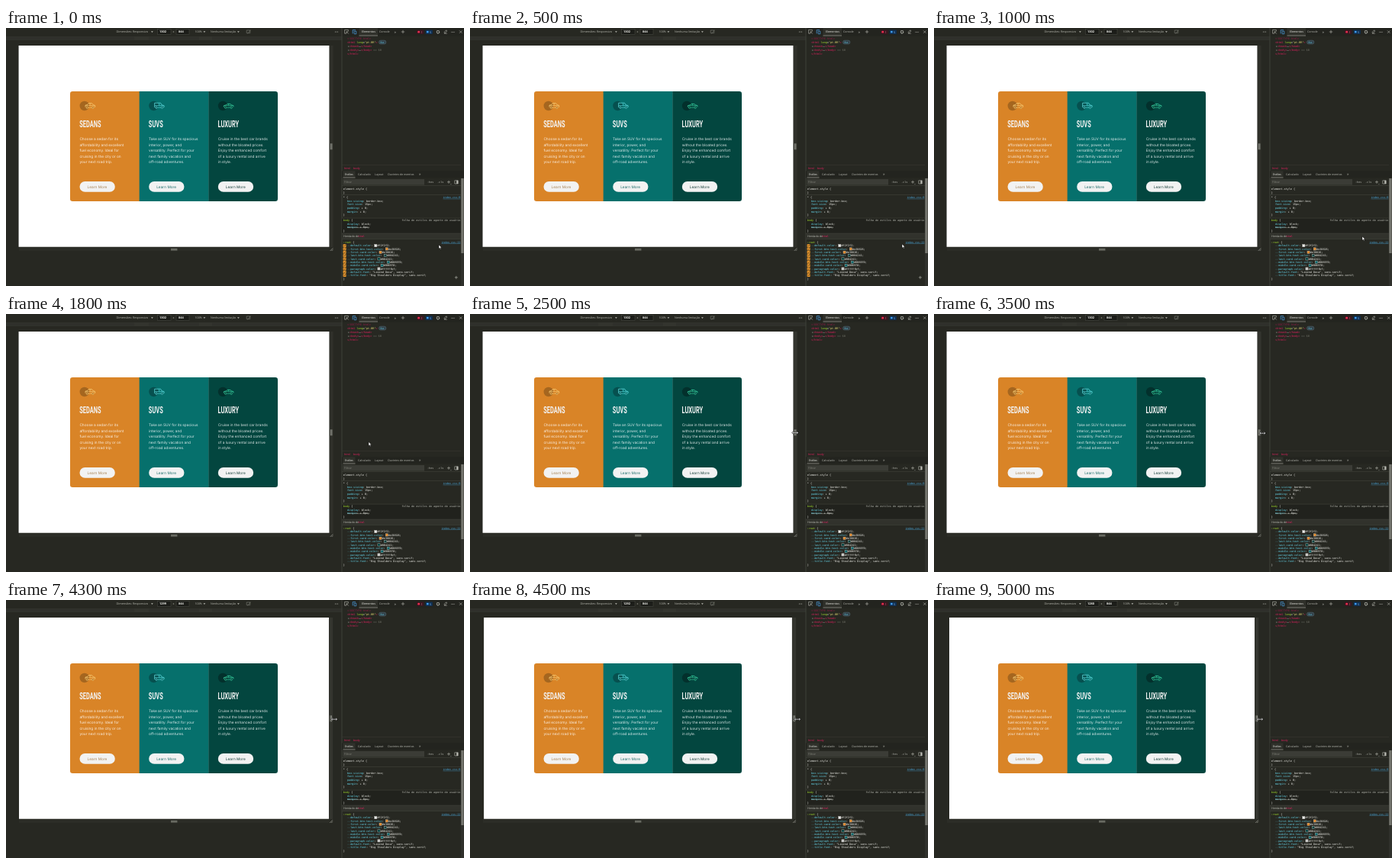
An HTML page that plays this animation: 600x338 px, repeating every 5100 ms.

```html
<!DOCTYPE html>
<html lang="pt-BR">
<head>
<meta charset="utf-8">
<title>Responsive cards</title>
<style>
  html, body { margin: 0; width: 100%; height: 100%; overflow: hidden; background: #272822; }
  svg { display: block; width: 600px; height: 338px; }
  text { white-space: pre; text-rendering: geometricPrecision; }
  .ui { font: 3.65px "Open Sans", "Noto Sans", sans-serif; }
  .mono { font: 3.46px "DejaVu Sans Mono", monospace; }
  .copy { font: 4.78px Inter, sans-serif; }
  .title { font: 700 12.6px Roboto, sans-serif; }
</style>
</head>
<body>
<svg id="stage" viewBox="0 0 600 338"></svg>
<script>
const LOOP = 5100, STEP = 100, SCALE = 0.3125, MID = 220;
const WHITE = '#f3f3ee', GREY = '#b9bab2', RED = '#e0205f', CYAN = '#66d9ef', GREEN = '#a6e22e';
const stage = document.getElementById('stage');

function add(tag, attrs, parent = stage) {
  const el = document.createElementNS('http://www.w3.org/2000/svg', tag);
  for (const k in attrs) el.setAttribute(k, attrs[k]);
  parent.appendChild(el);
  return el;
}
const rect = (x, y, width, height, fill, more = {}, parent) =>
  add('rect', { x, y, width, height, fill, ...more }, parent);
const path = (d, stroke, width = 0.6, more = {}, parent) =>
  add('path', { d, stroke, 'stroke-width': width, fill: 'none', ...more }, parent);
function text(cls, x, y, str, fill, more = {}, parent) {
  const el = add('text', { class: cls, x, y, fill, ...more }, parent);
  el.textContent = str;
  return el;
}
// Coloured runs: colour, string, colour, string...
function runs(x, y, parts, more = {}) {
  const el = add('text', { class: 'mono', x, y, ...more });
  for (let i = 0; i < parts.length; i += 2)
    add('tspan', { fill: parts[i] }, el).textContent = parts[i + 1];
}
const ui = (x, y, str, fill = GREY, more) => text('ui', x, y, str, fill, more);
const caret = (x, y) => path(`M${x} ${y}h2.8l-1.4 1.9z`, 'none', 0, { fill: GREY });
const dots = (x, y) => [-1.7, 0, 1.7].forEach(d => add('circle', { cx: x + d, cy: y, r: 0.5, fill: GREY }));

// Device toolbar
rect(0, 0, 440, 338, '#272822');
rect(0, 11, 440, 5, '#33342e');
[[0, 168], [187, 66], [270, 170]].forEach(([x, w]) => rect(x, 11.5, w, 4, '#2f302b'));
ui(144.5, 6.4, 'Dimensões: Responsivo', GREY, { style: 'font-size:3.75px' });
caret(190, 4.2);
rect(198.5, 1.5, 17.5, 7, '#1c1d19', { stroke: '#4b4c46', 'stroke-width': 0.5 });
rect(223, 1.5, 17, 7, '#1c1d19', { stroke: '#4b4c46', 'stroke-width': 0.5 });
const bold = { style: 'font-weight:700;font-size:3.9px' };
const widthLabel = ui(201, 6.4, '1302', WHITE, bold);
ui(218.4, 6.4, 'x');
ui(226, 6.4, '844', WHITE, bold);
ui(247.5, 6.4, '100%');
caret(258.5, 4.2);
ui(268, 6.4, 'Nenhuma limitação');
caret(303, 4.2);
path('M315.2 3h4.6v3.6h-4.6zM316.6 7.4l3.8-4.8', '#8b8c84', 0.5);
dots(433, 5);

// Page and its resize handles
const sheet = rect(0, 23, 0, 263.75, '#fff');
rect(17, 287, 407, 5, '#2c2d27');
path('M216 289.6h8.4M216 291h8.4', '#a5a69f', 0.7);
const side = add('g', {});
const bar = rect(0.6, 23, 4.6, 264, '#2f302a', {}, side);
path('M2 151.3v8M3.5 151.3v8', '#a5a69f', 0.8, {}, side);
path('M1.2 292l3.8-3.8M3.2 292l1.8-1.8', '#b5b6ae', 0.6, {}, side);

// Cards
add('clipPath', { id: 'round' });
rect(84, 83, 272, 144, '#fff', { rx: 3.2 }, document.getElementById('round'));
const cards = [
  ['SEDANS', '#d98427', '#a5661f', '#f6ca72', '#a98354',
    ['Choose a sedan for its', 'affordability and excellent', 'fuel economy. Ideal for', 'cruising in the city or on', 'your next road trip.']],
  ['SUVS', '#06706c', '#06504f', '#58d3d5', '#1d6e6b',
    ['Take an SUV for its spacious', 'interior, power, and', 'versatility. Perfect for your', 'next family vacation and', 'off-road adventures.']],
  ['LUXURY', '#03463f', '#03302c', '#35c79a', '#173f3a',
    ['Cruise in the best car brands', 'without the bloated prices.', 'Enjoy the enhanced comfort', 'of a luxury rental and arrive', 'in style.']]
];
const bodies = [
  'M104 103.6v-2.4l2.6-.6 1.8-2h4l2.2 2.2 2 .7v2.3',
  'M104 104v-5.8h7.8l2 2.8 2.6.6v2.4',
  'M104 103.6v-1.8l3-1 2-1.3h3.4l2 1.5 2.2.6v1.8'
];
const paint = add('g', { 'clip-path': 'url(#round)' });
cards.forEach(([name, fill, disc, line, ink, copy], i) => {
  const dx = i * 272 / 3;
  rect(84 + dx, 83, 91 - (i === 2 ? 0.3 : 0), 144, fill, {}, paint);
  const g = add('g', { transform: `translate(${dx} 0)` });
  add('circle', { cx: 102.8, cy: 102, r: 6.25, fill: disc }, g);
  path(bodies[i], line, 0.85, {}, g);
  path('M104.2 101.6h11.6M110 98.8v2.6M108 104.2h4.4', line, 0.65, {}, g);
  [106.4, 113.8].forEach(cx =>
    add('circle', { cx, cy: 104.2, r: 1.25, fill: disc, stroke: line, 'stroke-width': 0.75 }, g));
  text('title', 0, 0, name, '#f2f2f2', { transform: 'translate(96.2 130) scale(.59 1)' }, g);
  copy.forEach((str, n) => text('copy', 96.4, 147 + n * 7.5, str, '#fff', { opacity: 0.86 }, g));
  rect(96.5, 201, 46.3, 13.8, '#f2f2f2', { rx: 6.9 }, g);
  text('copy', 106.5, 209.6, 'Learn More', ink, {}, g);
});

// Inspector header
rect(440, 0, 160, 338, '#272822');
rect(440, 0, 160, 10.5, '#23241f');
rect(462.5, 0, 24.5, 10.5, '#30312b');
rect(462.5, 9.6, 24.5, 0.8, '#8a8b82');
rect(439.6, 0, 0.8, 338, '#45463f');
path('M446 7.2h-2.4v-4.8h4.8v2M446 4.8l2.8 2.8M446 4.8v2.2M446 4.8h2.2', GREY, 0.6);
path('M454.2 7.4v-4.8h3.8M456.2 4.2h2.6v3.6h-2.6z', '#4da3e8', 0.7);
ui(466, 6.4, 'Elementos', WHITE);
ui(489, 6.4, 'Console');
ui(508.4, 6.5, '»', GREY, { style: 'font-size:5px' });
path('M517.8 5h4.4M520 2.8v4.4', GREY, 0.6);
rect(538, 2.4, 9.4, 5.6, '#3b1721', { rx: 1 });
add('circle', { cx: 540.7, cy: 5.2, r: 1.4, fill: '#ee2f50' });
ui(543.6, 6.5, '1', '#f08a9c');
rect(549.5, 2.4, 9.4, 5.6, '#0f2f52', { rx: 1 });
rect(551, 3.9, 2.6, 2.4, '#3f9cf0');
ui(555, 6.5, '5', '#8fc4f6');
add('circle', { cx: 566, cy: 5.2, r: 1.7, fill: 'none', stroke: GREY, 'stroke-width': 1.1, 'stroke-dasharray': '.9 .25' });
path('M574 5.8l2-2.6h1.4v1.2l-2.4 2.6zM573.8 7.2h4', GREY, 0.6);
dots(585.5, 5.2);
path('M594 3.4l3.4 3.4M597.4 3.4l-3.4 3.4', GREY, 0.6);

// Element tree
runs(447, 14.6, ['#8d1b45', '<!DOCTYPE html>']);
runs(447, 19.6, [RED, '<html ', GREEN, 'lang', WHITE, '=', '#e6db74', '"pt-BR"', RED, '>']);
rect(488.5, 16.2, 9.4, 4.8, '#33414a', { rx: 2.3, stroke: '#63808f', 'stroke-width': 0.4 });
ui(490.4, 19.6, 'flex', CYAN, { style: 'font-size:3px' });
['head', 'body'].forEach((tag, i) =>
  runs(448, 24.7 + i * 5, [GREY, '▸', RED, `<${tag}>`, WHITE, '…', RED, `</${tag}>`, '#77786f', i ? ' == $0' : '']));
runs(447, 34.8, [RED, '</html>']);

// Breadcrumb, tabs and filter
rect(440, 179, 156, 0.5, '#3a3b35');
ui(443, 184.6, 'html', RED);
ui(455, 184.6, 'body', RED);
rect(440, 187.4, 160, 9, '#23241f');
rect(441.5, 187.4, 16, 9, '#30312b');
rect(441.5, 195.6, 16, 0.8, '#8a8b82');
ui(444, 193.2, 'Estilos', WHITE);
ui(461, 193.2, 'Calculado');
ui(483, 193.2, 'Layout');
ui(500, 193.2, 'Ouvintes de eventos');
ui(541, 193.4, '»', GREY, { style: 'font-size:5px' });
rect(441.5, 198, 106.5, 7.6, '#3b3c36');
ui(443, 203, 'Filtrar', '#85867e');
runs(552, 203, [GREY, ':hov']);
runs(565, 203, [GREY, '.cls']);
path('M578 201.8h4M580 199.8v4M582.4 204.6h1', GREY, 0.6);
path('M587.8 199.8h4.4v4.2h-4.4z', GREY, 0.6);
rect(590.2, 199.8, 2, 4.2, GREY);
rect(440, 206.4, 156, 0.5, '#45463f');

// Style rules
rect(440, 249, 156, 19.8, '#21221d');
rect(440, 269, 156, 7.4, '#31322c');
[218.4, 248.8, 268.8, 276.4].forEach(y => rect(440, y, 156, 0.5, '#45463f'));
rect(595.8, 196.6, 4.2, 141.4, '#30312c');
rect(596.2, 197, 3.4, 98, '#74756e');
const prop = (y, name, value, more) => runs(447, y, [CYAN, name, WHITE, ': ' + value + ';'], more);
const link = (y, str) =>
  text('mono', 595.4, y, str, '#4aa8dc', { 'text-anchor': 'end', 'text-decoration': 'underline' });
const brace = y => runs(441.8, y, [WHITE, '}']);
runs(441.8, 211.5, [WHITE, 'element.style {']);
brace(216.6);
runs(441.8, 222.8, [WHITE, '* {']);
link(222.8, 'index.css:9');
prop(227.6, 'box-sizing', 'border-box');
prop(232.2, 'font-size', '15px');
prop(236.9, 'padding', '▸ 0');
prop(241.6, 'margin', '▸ 0');
brace(246.2);
runs(441.8, 252.9, [GREEN, 'body', WHITE, ' {'], { 'font-style': 'italic' });
text('mono', 595.4, 252.9, 'folha de estilos de agente de usuário', GREY, { 'text-anchor': 'end', 'font-style': 'italic' });
prop(257.8, 'display', 'block');
prop(262.4, 'margin', '▸ 8px');
rect(447, 261, 29, 0.4, GREY);
brace(266.9);
ui(442, 274, 'Herdado de');
runs(461.6, 274, [RED, 'html']);
runs(441.8, 281.6, [GREEN, ':root', WHITE, ' {']);
link(281.6, 'index.css:11');

const vars = [
  ['default-color', '#f2f2f2'],
  ['first-btn-text-color', '#e38826'],
  ['first-card-color', '#e38826'],
  ['last-btn-text-color', '#004241'],
  ['last-card-color', '#004241'],
  ['middle-btn-text-color', '#006970'],
  ['middle-card-color', '#006970'],
  ['paragraph-color', '#ffffffbf'],
  ['default-font', '"Lexend Deca", sans-serif'],
  ['title-font', '"Big Shoulders Display", sans-serif']
];
const hover = add('g', {});
vars.forEach(([name, value], i) => {
  const y = 286.4 + i * 4.33, isColor = value[0] === '#';
  prop(y, '--' + name, (isColor ? '  ' : '') + value);
  if (isColor)
    rect(447 + (name.length + 4) * 2.083 + 0.3, y - 2.9, 3.2, 3.2, value, { stroke: '#c4c5bd', 'stroke-width': 0.4 });
  rect(441.6, y - 3.2, 4, 3.8, '#ef9a2c', { rx: 0.6 }, hover);
  path(`M442.5 ${y - 1.3}l.9 .9 1.5-1.9`, '#272822', 0.6, {}, hover);
});
brace(330.4);
path('M587.8 326.8h4M589.8 324.8v4', GREY, 0.6, {}, hover);

// Pointers
const arrow = path('M0 0v5.2l1.25-1.1.9 1.9.9-.4-.85-1.85h1.6z', '#000', 0.45, { fill: '#fff' });
const resize = add('g', {});
const arrows = 'M-3.6 0h7.2M-2.2-1.3l-1.4 1.3 1.4 1.3M2.2-1.3l1.4 1.3-1.4 1.3';
path(arrows, '#000', 1.5, {}, resize);
path(arrows, '#fff', 0.75, {}, resize);

// Time, x, y
const trail = [
  [0, 567, 284], [500, 566, 283], [700, 564.5, 280], [1000, 561, 273], [1200, 559, 271.5],
  [1300, 550, 260], [1500, 518, 219], [1700, 484, 178], [1800, 475, 167.5], [1900, 470, 165],
  [2100, 453, 160], [2400, 430, 156], [2500, 426, 155.6], [3200, 426, 155.6],
  [3300, 427.5, 156], [3500, 430.4, 156.2], [5100, 430.4, 156.2]
];
// Time, viewport width
const widths = [[0, 1302], [4200, 1302], [4500, 1292], [4800, 1283], [5000, 1280], [5100, 1280]];

function at(keys, t) {
  const i = Math.max(1, keys.findIndex(k => k[0] > t));
  const a = keys[i - 1], b = keys[i], f = (t - a[0]) / (b[0] - a[0]);
  return a.slice(1).map((v, n) => v + (b[n + 1] - v) * f);
}
const show = (el, on) => el.setAttribute('visibility', on ? 'visible' : 'hidden');

function draw(now) {
  const t = Math.floor(now % LOOP / STEP) * STEP;
  const px = Math.round(at(widths, t)[0]), w = px * SCALE, right = MID + w / 2;
  const [x, y] = at(trail, t);
  const drag = (1302 - px) * SCALE / 2, onEdge = t >= 2500;
  sheet.setAttribute('x', MID - w / 2);
  sheet.setAttribute('width', w);
  side.setAttribute('transform', `translate(${right} 0)`);
  bar.setAttribute('fill', onEdge ? '#34352f' : '#2f302a');
  widthLabel.textContent = px;
  show(hover, t < 800);
  show(arrow, !onEdge);
  show(resize, onEdge);
  (onEdge ? resize : arrow).setAttribute('transform', `translate(${x - drag} ${y})`);
}
function tick() {
  draw(performance.now());
  requestAnimationFrame(tick);
}
tick();
</script>
</body>
</html>
```
